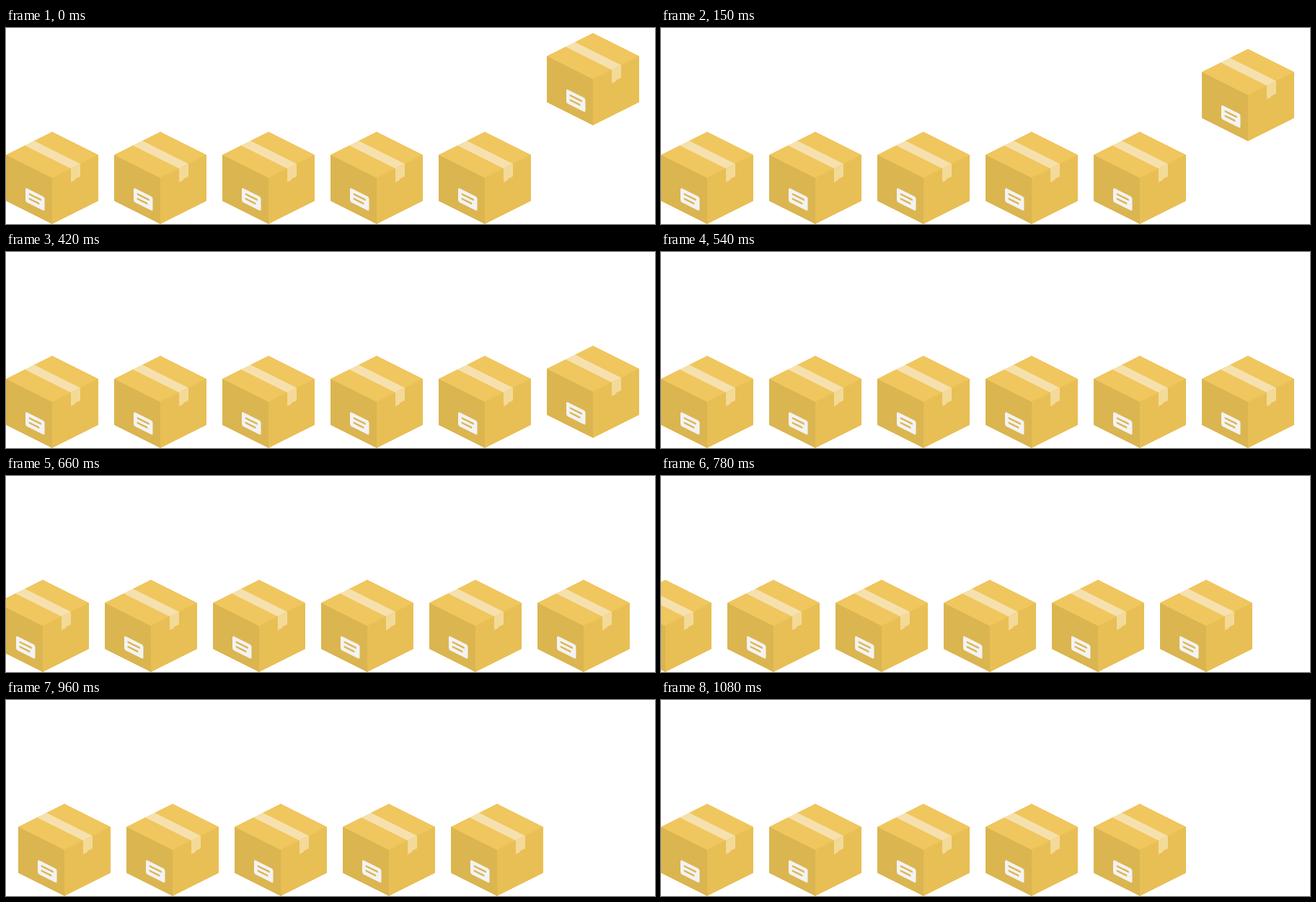
An HTML page with a canvas for the animation above (1140 ms loop, 900 px wide and 272 px high).

```html
<!DOCTYPE html>
<html lang="en">
<head>
<meta charset="utf-8">
<title>Boxes</title>
<style>
  html, body { margin: 0; width: 100%; height: 100%; overflow: hidden; background: #fff; }
  canvas { display: block; }
</style>
</head>
<body>
<canvas id="stage" width="900" height="272"></canvas>
<script>
const ctx = document.getElementById('stage').getContext('2d');
const LOOP = 1140, STEP = 30, MOVE = 510;
const DROP_AT = 17, SLIDE_AT = 562;
const COUNT = 6, GAP = 150, ROW_Y = 144, DROP = 137;
const SIZE = 128, EDGE = SIZE / 2;
const LEFT = '#dbb550', TOP = '#f0c65e', RIGHT = '#e8bf55';
const LABEL = '#f3f3f3', TAPE = '#f6e1ae', TAPE_END = '#f3da98';

// Every part is a rectangle sheared onto one face of the box.
function makeBox() {
  const sprite = document.createElement('canvas');
  sprite.width = sprite.height = SIZE;
  const g = sprite.getContext('2d');

  const rect = (color, x, y, w, h, r = 0) => {
    g.fillStyle = color;
    g.beginPath();
    g.roundRect(x, y, w, h, r);
    g.fill();
  };

  g.setTransform(1, 0.5, 0, 1, 0, EDGE / 2);
  rect(LEFT, 0, 0, EDGE, EDGE);
  rect(LABEL, 27, 32, 26.5, 19.5, 2.5);
  rect(LEFT, 31.5, 37, 17.5, 2.6, 1.3);
  rect(LEFT, 31.5, 43.5, 15, 2.6, 1.3);

  g.setTransform(1, 0.5, 1, -0.5, 0, EDGE / 2);
  rect(TOP, 0, 0, EDGE, EDGE);
  rect(TAPE, 0, 26, EDGE, 13);

  g.setTransform(1, -0.5, 0, 1, EDGE, EDGE);
  rect(RIGHT, 0, 0, EDGE, EDGE);
  rect(TAPE_END, 26, 0, 13, 17.5);
  rect(TAPE_END, 26, 17, 6, 2);

  hardenEdge(g);
  return sprite;
}

// The outline is crisp, while the inner edges stay smooth.
function hardenEdge(g) {
  const img = g.getImageData(0, 0, SIZE, SIZE);
  for (let i = 3; i < img.data.length; i += 4) {
    img.data[i] = img.data[i] < 128 ? 0 : 255;
  }
  g.putImageData(img, 0, 0);
}

function ease(ms) {
  const p = Math.min(1, Math.max(0, ms / MOVE));
  return 0.5 - Math.cos(Math.PI * p) / 2;
}

const box = makeBox();

function draw(now) {
  const t = Math.floor((now % LOOP) / STEP) * STEP;
  const shift = Math.round(GAP * ease(t - SLIDE_AT));
  const lift = Math.round(DROP * (1 - ease(t - DROP_AT)));
  ctx.fillStyle = '#fff';
  ctx.fillRect(0, 0, 900, 272);
  for (let i = 0; i < COUNT; i++) {
    const last = i === COUNT - 1;
    ctx.drawImage(box, i * GAP - shift, ROW_Y - (last ? lift : 0));
  }
}

const start = performance.now();
function frame() {
  draw(performance.now() - start);
  requestAnimationFrame(frame);
}
frame();
</script>
</body>
</html>
```
